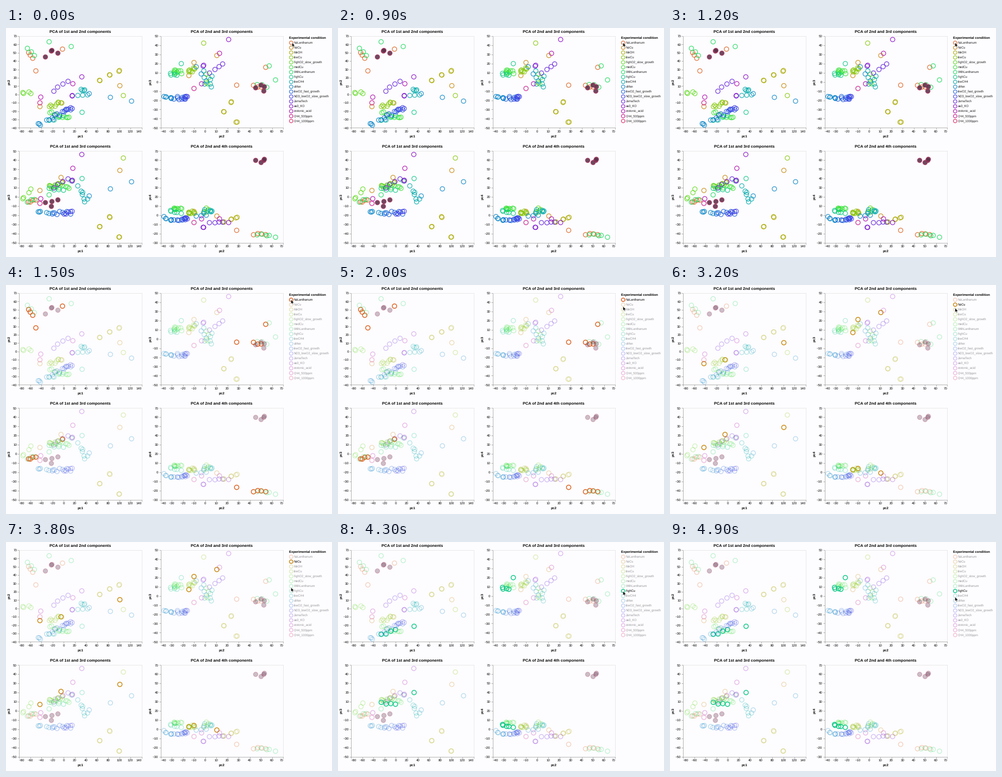
Recreate the animation shown at these times as a matplotlib script. Size 600x423 px, loop 5 s.

```python
import math

import numpy as np
import matplotlib.pyplot as plt
from matplotlib.animation import FuncAnimation
from matplotlib.patches import Polygon

W, H, DPI = 600, 423, 100
STEP, FRAMES = 100, 50
PLOT_W, PLOT_H = 225.5, 169.3
PX = 72 / DPI  # points per pixel

plt.rcParams.update({"font.family": "Liberation Sans", "text.hinting": "no_hinting"})

NAMES = [
    "NoLanthanum", "NoCu", "MeOH", "lowCu", "highO2_slow_growth", "medCu",
    "WithLanthanum", "highCu", "lowCH4", "uMax", "lowO2_fast_growth",
    "NO3_lowO2_slow_growth", "JurnaTech", "aa3_KO", "crotonic_acid",
    "CH4_500ppm", "CH4_1000ppm",
]
FILLED = "CH4_1000ppm"


def sinebow(t):
    return [0.03 + 0.86 * math.sin(math.pi * (0.5 - t + k / 3)) ** 2 for k in range(3)]


COLORS = {n: sinebow((i + 1) / (len(NAMES) + 1)) for i, n in enumerate(NAMES)}

rng = np.random.default_rng(7)
samples = {n: np.empty((0, 4)) for n in NAMES}


def trail(name, n, start, end=None, jitter=0.0):
    """Add n samples from start to end in (pc1, pc2, pc3, pc4), with noise."""
    line = np.linspace(start, start if end is None else end, n)
    noise = rng.uniform(-1, 1, (n, 4)) * jitter * np.array([1, 1, 1, 0.7])
    samples[name] = np.vstack([samples[name], line + noise])


trail("NoLanthanum", 3, (-63, 49.5, -6, -20), (-56, 43.5, -3.3, -21), 1)
trail("NoLanthanum", 1, (-49.8, 28.3, -3.5, -16.5))
trail("NoLanthanum", 1, (-2, 54.4, 16, -21.2))
trail("NoCu", 2, (-42.5, -14.6, 7, 2.7), (-4.6, -10, 21.2, 4.1))
trail("NoCu", 1, (101, 10.5, 28.9, -0.9))
for k, depth in enumerate((-33, -21.6, -43.5)):
    trail("MeOH", 2, (65.5 + 17.4 * k, 17.6 + 5.2 * k, depth, -7 + 2.3 * k), jitter=1)
trail("lowCu", 8, (-27, -14, 10, 3), (-5, -11, 15, 3.5), 2.5)
trail("lowCu", 1, (107.3, -1.3, 42.4, 3))
trail("highO2_slow_growth", 4, (-73, 2, -1, 4), (-61, 2, 8, 7), 3)
trail("medCu", 10, (-24, -22, 11, 6.5), (10, -29, 11, 6.5), 2)
trail("WithLanthanum", 3, (-65, 54, -5, -23), (-52, 47, -2, -20.5), 1.5)
trail("WithLanthanum", 2, (-26, 63.2, 2.2, -24), (13.7, 57.5, 17.5, -22))
trail("highCu", 4, (-25.4, -32, 9.4, 5), (-1, -26, 6.5, 3), 1)
trail("highCu", 1, (33.2, -21.4, 20, 2))
trail("lowCH4", 3, (25.5, -1.2, 12, 2), (43, -0.5, -2.3, 6))
trail("lowCH4", 4, (31, 5.8, 6, 5), (38.5, 5.3, -6, 4), 1)
trail("uMax", 3, (122, -8, 16.5, -1), (46, 1, 1, 0))
trail("uMax", 3, (-46, -35.5, -16, -4), (-42, -36.5, -16, -2), 0.8)
trail("uMax", 3, (-30, -30, -17, -6), (-20, -30, -17, -5), 1.5)
trail("lowO2_fast_growth", 8, (-19, -27, -18, -5), (12, -18, -17, -4), 2)
trail("NO3_lowO2_slow_growth", 5, (0, -20, -18, -4.5), (15, -16, -16.5, -3.5), 1.5)
trail("JurnaTech", 4, (-18, 4, 10, -8), (7, 16, 20.5, -8), 1.2)
trail("JurnaTech", 1, (15.5, -1.8, 17.3, -13.2))
trail("aa3_KO", 2, (32.7, 21.1, 46.3, -8), (15.6, -1.3, 18.2, -13.3))
trail("crotonic_acid", 2, (16.6, 12.9, 31.2, -4), (-41, -3.2, -2, -4))
trail("CH4_500ppm", 1, (-42.5, -10, -7.1, -8))
trail(FILLED, 2, (-33.2, 45.2, -6.1, 60.2), (-10.7, 49.8, -2.9, 57.5))
trail(FILLED, 2, (-22.3, 52.4, -9.9, 59.9), (-21.2, 52.8, -4.9, 61.6))

fig = plt.figure(figsize=(W / DPI, H / DPI), dpi=DPI, facecolor="#fdfcfe")

page = fig.add_axes([0, 0, 1, 1], zorder=5)
page.set(xlim=(0, W), ylim=(H, 0))
page.axis("off")


def label(x, y, text, size, ha="center", bold=False, rotation=0):
    return page.text(x, y, text, fontsize=size * PX, ha=ha, va="center",
                     weight="bold" if bold else "normal", rotation=rotation)


def marks(ax, x, y, radius, color, fill="none"):
    return ax.scatter(x, y, s=(2 * radius * PX) ** 2, facecolors=fill, edgecolors=[color])


# condition -> artists that follow the legend selection
rings = {n: [] for n in NAMES}
texts = {}


def panel(left, top, title, cx, cy, xticks, yticks):
    ax = fig.add_axes([left / W, 1 - (top + PLOT_H) / H, PLOT_W / W, PLOT_H / H])
    ax.patch.set_alpha(0)
    ax.set_xticks(xticks)
    ax.set_yticks(yticks)
    ax.set(xlim=(xticks[0], xticks[-1]), ylim=(yticks[0], yticks[-1]))
    ax.tick_params(length=2.8 * PX, width=0.6 * PX, pad=1.2 * PX,
                   color="#888888", labelsize=6.1 * PX)
    for side, spine in ax.spines.items():
        spine.set(linewidth=0.6 * PX,
                  color="#888888" if side in ("left", "bottom") else "#dddddd")
    ends = ax.get_xticklabels()
    ends[0].set_ha("left")
    ends[-1].set_ha("right")
    mid_x, mid_y = left + PLOT_W / 2, top + PLOT_H / 2
    label(mid_x, top - 8.6, title, 7.33, bold=True)
    label(mid_x, top + 185, f"pc{cx}", 6.4, bold=True)
    label(left - 18.5, mid_y, f"pc{cy}", 6.4, bold=True, rotation=90)
    for name in NAMES:
        data = samples[name]
        fill, edge = ("#5a3049", "#a83860") if name == FILLED else ("none", COLORS[name])
        rings[name].append(marks(ax, data[:, cx - 1], data[:, cy - 1], 4.1, edge, fill))


def ticks(lo, hi, step=10):
    return np.arange(lo, hi + 1, step)


panel(24, 15, "PCA of 1st and 2nd components", 1, 2, ticks(-80, 140, 20), ticks(-40, 70))
panel(284.5, 15, "PCA of 2nd and 3rd components", 2, 3, ticks(-40, 70), ticks(-50, 50))
panel(24, 227.3, "PCA of 1st and 3rd components", 1, 3, ticks(-80, 140, 20), ticks(-50, 50))
panel(284.5, 227.3, "PCA of 2nd and 4th components", 2, 4, ticks(-40, 70), ticks(-30, 70))

label(521, 18.7, "Experimental condition", 6.2, ha="left", bold=True)
for i, name in enumerate(NAMES):
    y = 27.3 + 9.03 * i
    rings[name].append(marks(page, [524.8], [y], 3.2, COLORS[name]))
    texts[name] = label(530, y, name, 5.64, ha="left")

ARROW = 1.1 * np.array([(0, 0), (0, 7.2), (1.7, 5.7), (2.8, 8.2), (4, 7.7), (2.9, 5.3), (5.2, 5.2)])
cursor = page.add_patch(Polygon(ARROW, fc="#111111", ec="white", lw=0.4, zorder=10))

# pointer rests at legend entries, glides between them
MOVE_T = [1500, 2000, 2700, 3100, 3800, 4200, 4900]
MOVE_Y = [27, 39.5, 35.5, 35.5, 84, 89, 101.5]
CLICKS = [(1300, "NoLanthanum"), (3000, "NoCu"), (4200, "highCu")]


def update(i):
    t = i * STEP
    picked = None
    for when, name in CLICKS:
        if t >= when:
            picked = name
    for name in NAMES:
        if picked is None:
            alpha, width, ink = 0.88, 1.2, 0.88
        elif name == picked:
            alpha, width, ink = 1, 1.4, 1
        else:
            alpha, width, ink = 0.3, 1.2, 0.4
        for ring in rings[name]:
            ring.set_alpha(alpha)
            ring.set_linewidth(width * PX)
        texts[name].set_alpha(ink)
    tip = (524.6 + 1.8 * max(0, 1 - t / 300), np.interp(t, MOVE_T, MOVE_Y))
    cursor.set_xy(ARROW + tip)
    return []


anim = FuncAnimation(fig, update, frames=FRAMES, interval=STEP,
                     init_func=lambda: update(0), repeat=True, repeat_delay=0)
plt.show()
```
